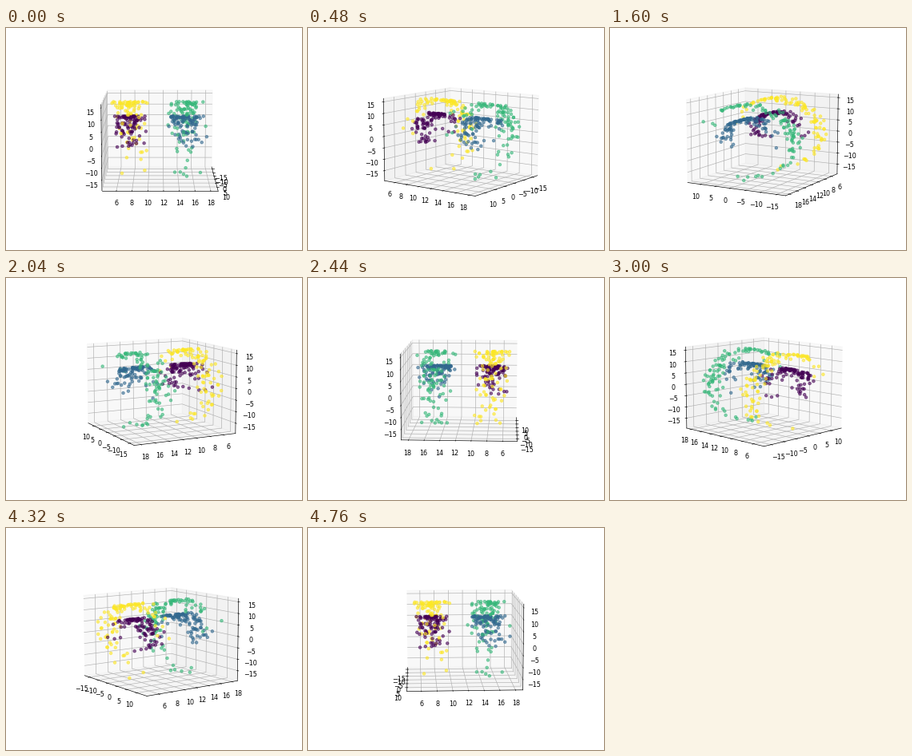
These frames come from a looping animation (370x278 px, 4.8 s). A matplotlib script:

```python
import numpy as np
import matplotlib.pyplot as plt
from matplotlib.animation import FuncAnimation

WIDTH, HEIGHT, DPI = 370, 278, 57.8125
FRAMES, INTERVAL = 120, 40
STEP = 360 / FRAMES
PER_CLUSTER = 100
NEAR, FAR = 7.5, 15.0
MAX_DEVIATION = 2.45

plt.rcParams["font.family"] = "DejaVu Sans"
plt.rcParams["axes3d.automargin"] = False


def sample_cluster(rng, centre):
    """Gaussian blob on the flat sheet, cut off at its far tails."""
    blob = rng.normal(size=(2 * PER_CLUSTER, 2))
    inside = np.all(np.abs(blob) < MAX_DEVIATION, axis=1)
    return centre + blob[inside][:PER_CLUSTER] * (1.0, 1.1)


def roll_up(sheet):
    """Wrap (angle, height) points into a Swiss roll."""
    angle, height = sheet.T
    return angle * np.cos(angle), height, angle * np.sin(angle)


rng = np.random.default_rng(11)
centres = [(NEAR, NEAR), (NEAR, FAR), (FAR, FAR), (FAR, NEAR)]
sheet = np.vstack([sample_cluster(rng, centre) for centre in centres])
labels = np.repeat(np.arange(len(centres)), PER_CLUSTER)

fig = plt.figure(figsize=(WIDTH / DPI, HEIGHT / DPI), dpi=DPI)
ax = fig.add_subplot(projection="3d")
ax.scatter(*roll_up(sheet), c=labels, cmap="viridis", s=20, alpha=0.6,
           depthshade=False)

ax.set_xticks(range(-15, 11, 5))
ax.set_yticks(range(6, 19, 2))
ax.set_zticks(range(-15, 16, 5))
ax.set_xlim(-17.8, 14.67)
ax.set_ylim(4.16, 18.94)
ax.set_zlim(-19.5, 16.46)


def draw(i):
    ax.view_init(elev=10, azim=STEP * i)
    return []


anim = FuncAnimation(fig, draw, frames=FRAMES, interval=INTERVAL,
                     repeat=True, repeat_delay=0)
plt.show()
```
